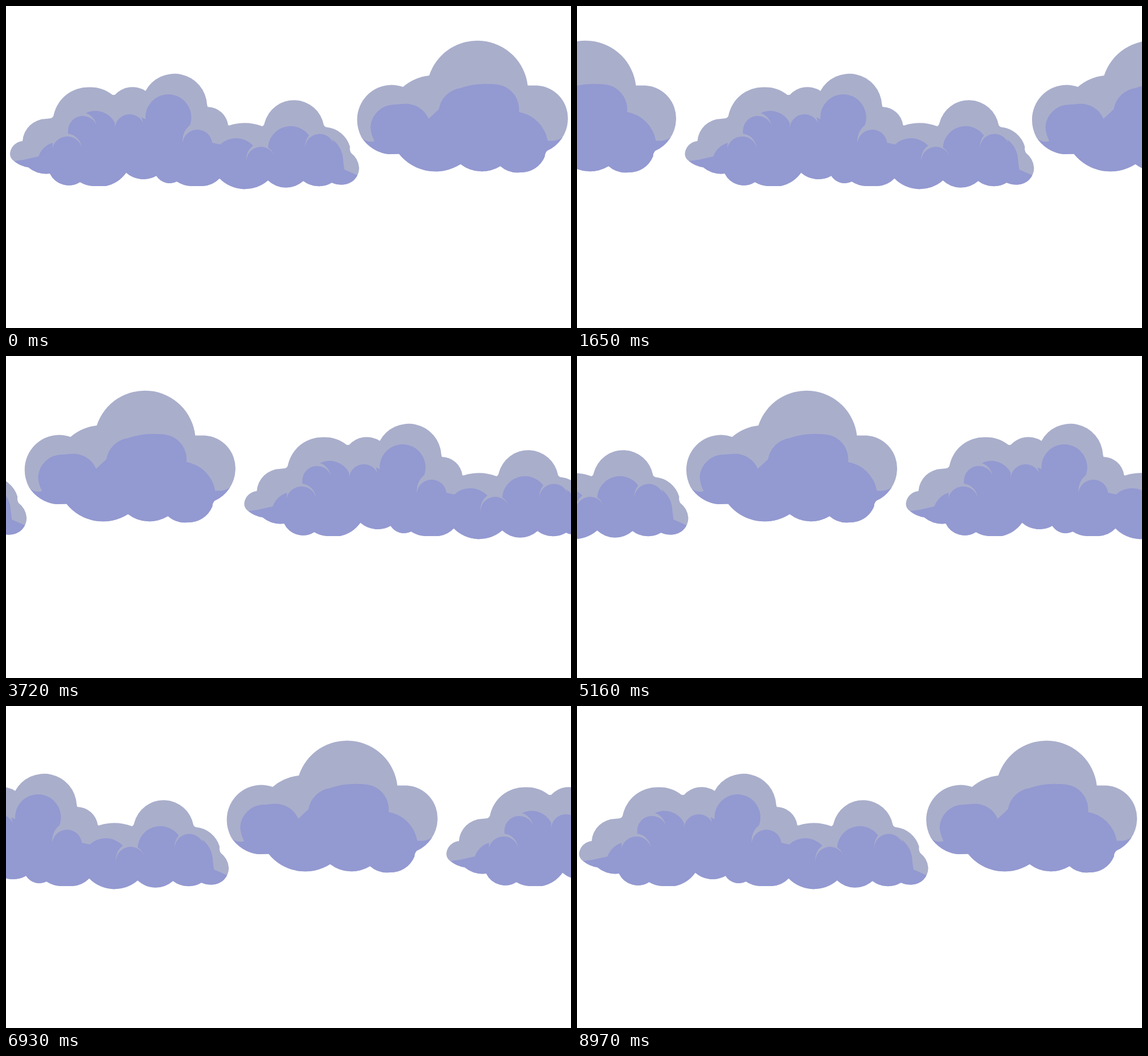
Recreate the animation shown at these times as an HTML page. Size 992x565 px, loop 9 s.

```html
<!DOCTYPE html>
<html lang="en">
<head>
<meta charset="utf-8">
<title>Drifting clouds</title>
<style>
  html, body { margin: 0; width: 100%; height: 100%; overflow: hidden; background: #fff; }
  svg { display: block; width: 992px; height: 565px; }
</style>
</head>
<body>
<svg viewBox="0 0 992 565">
  <defs>
    <path id="long"/>
    <path id="tall"/>
    <clipPath id="outline"><use href="#long"/><use href="#tall"/></clipPath>
    <g id="clouds">
      <g fill="#a9aecb"><use href="#long"/><use href="#tall"/></g>
      <g fill="#9399d1" clip-path="url(#outline)"><path id="longShade"/><path id="tallShade"/></g>
    </g>
  </defs>
  <g id="sky">
    <use href="#clouds"/>
    <use href="#clouds" x="-995"/>
  </g>
</svg>
<script>
  const LOOP = 9000, STEP = 30, SPAN = 995;
  const byId = id => document.getElementById(id);

  // Each triple is an end point and a radius: positive bulges out, negative in, 0 is straight.
  function shape(id, x, y, arcs) {
    let d = `M${x} ${y}`;
    for (let i = 0; i < arcs.length; i += 3) {
      const [px, py, r] = arcs.slice(i, i + 3);
      d += r ? `A${Math.abs(r)} ${Math.abs(r)} 0 0 ${r > 0 ? 1 : 0} ${px} ${py}` : `L${px} ${py}`;
    }
    byId(id).setAttribute('d', d + 'Z');
  }

  shape('long', 7, 260, [
    29, 237, 24, 70, 198, 42, 79, 197, 0, 84, 190, -8, 145, 142.5, 62,
    187, 156, 62, 191, 156, 0, 245, 149, 42, 353, 173, 57.5, 354, 177, 0,
    390, 209, 37, 394, 209, -4, 450, 211, 89, 454, 205, -8, 558, 209, 53.3,
    562, 212.5, -6, 604, 247, 48, 606, 258, -15, 620, 284, 36, 591, 313.5, 29.5,
    572, 310, 40, 522, 307, 45, 460, 306, 46, 375, 302.5, 62, 345, 316, 45,
    325, 316, 0, 300, 308, 50, 264, 298, 28, 211, 292.5, 46, 175, 316, 60,
    153, 316, 0, 130, 309, 50, 77, 294, 37, 39, 283, 51, 14, 272, 50, 7, 260, 16
  ]);

  shape('longShade', 0, 272, [
    14, 272, 0, 30, 270, 0, 57, 264, 0, 82, 240, 38, 81, 258, 0,
    133, 248, 26.6, 109, 224, -28, 109, 218, 0, 159, 209, 26, 140, 188, -28,
    191, 205, 38, 191, 216, 0, 241, 206, 26, 238, 195, 0, 245, 199, 0,
    285, 155, 40.5, 323, 209, 40.5, 310, 240, -35, 362, 240, 26.2, 376, 243, 0,
    434, 245, 41, 422, 274, -30, 472, 265, 25.6, 460, 248, -30, 532, 227, 40,
    525, 252, -35, 576, 245, 25.8, 573, 234, 0, 592, 272, 50, 594, 287, 0,
    617, 297, 0, 622, 330, 0, 0, 330, 0
  ]);

  shape('tall', 616.5, 200, [
    676, 138.5, 61, 697, 142, 60, 743, 122, 85, 916, 139.5, 89, 933, 139.5, 0,
    986.5, 200, 57.5, 950, 254, 62, 946, 264, -15, 902, 292, 45, 868, 281, 45,
    798, 277.5, 62, 690, 259.5, 82, 672, 260, 0, 624, 230, 65, 616.5, 200, 65
  ]);

  shape('tallShade', 622, 227, [
    647, 237, -20, 640, 212, 60, 683, 173, 42, 702, 171.5, 0, 742, 198, 44,
    760, 181, 0, 798, 144, 45, 850, 137, 130, 872, 140, 60, 900.5, 186, 44,
    951, 236.5, 62, 962, 236.5, 0, 984, 225, -40, 990, 300, 0, 625, 300, 0
  ]);

  const sky = byId('sky');
  const start = performance.now();

  function draw(now) {
    const time = Math.max(0, now - start) % LOOP;
    const held = Math.floor(time / STEP) * STEP;
    sky.setAttribute('transform', `translate(${held / LOOP * SPAN} 0)`);
    requestAnimationFrame(draw);
  }
  draw(start);
</script>
</body>
</html>
```
